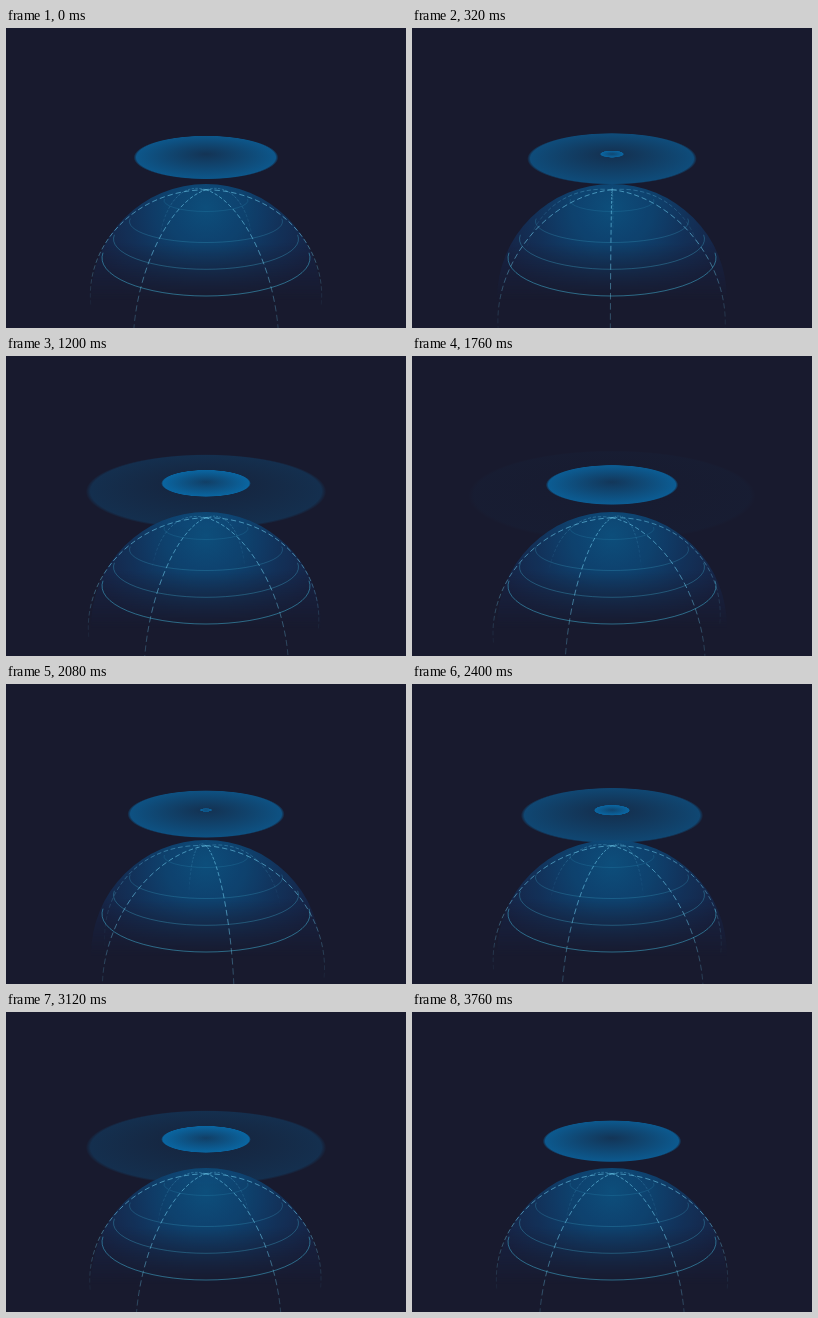
These frames come from a looping animation (400x300 px, 3.84 s). An HTML page:

```html
<!DOCTYPE html>
<html lang="en">
<head>
<meta charset="utf-8">
<title>Globe with ripples</title>
<style>
  html, body { margin: 0; width: 100%; height: 100%; overflow: hidden; background: #181a2e; }
  svg { display: block; width: 100vw; height: 100vh; }
</style>
</head>
<body>
<svg id="stage" viewBox="0 0 400 300">
  <defs>
    <radialGradient id="ball" gradientUnits="userSpaceOnUse" cx="200" cy="180" r="118">
      <stop offset="0" stop-color="#0d517f"/>
      <stop offset=".35" stop-color="#0e4371"/>
      <stop offset=".7" stop-color="#133058"/>
      <stop offset="1" stop-color="#172345"/>
    </radialGradient>
    <linearGradient id="fade" gradientUnits="userSpaceOnUse" x1="0" y1="215" x2="0" y2="272">
      <stop offset="0" stop-color="#fff" stop-opacity=".95"/>
      <stop offset="1" stop-color="#fff" stop-opacity="0"/>
    </linearGradient>
    <mask id="soft" maskUnits="userSpaceOnUse" x="0" y="0" width="400" height="300">
      <rect width="400" height="300" fill="url(#fade)"/>
    </mask>
  </defs>
  <rect width="400" height="300" fill="#181a2e"/>
  <g id="ripples"></g>
  <circle cx="200" cy="271" r="115" fill="url(#ball)" mask="url(#soft)"/>
  <g id="rings" fill="none" stroke="#43b4d6"></g>
  <g id="meridians" stroke="#6cc8ea"></g>
</svg>
<script>
const STEP = 80, FRAMES = 48, CX = 200;
const RAD = Math.PI / 180;
const $ = id => document.getElementById(id);

function add(parent, tag, attrs) {
  const el = document.createElementNS("http://www.w3.org/2000/svg", tag);
  parent.append(el);
  return set(el, attrs);
}
function set(el, attrs) {
  for (const key in attrs) el.setAttribute(key, attrs[key]);
  return el;
}
const clamp = v => Math.max(0, Math.min(1, v));

// Ripples: flat discs seen in perspective
const RIPPLE = { y: 126, depth: 430, radius: 143, sin: 0.954, cos: 0.3 };

function makeRipple(name) {
  const grad = add($("ripples"), "radialGradient", { id: name, cx: 0.5, cy: 0.5, r: 0.5, fx: 0.5 });
  for (const [offset, alpha] of [[0, 0.36], [0.5, 0.61], [0.96, 0.85], [1, 0]])
    add(grad, "stop", { offset, "stop-color": "#0870b1", "stop-opacity": alpha });
  return { grad, disc: add($("ripples"), "ellipse", { cx: CX, fill: `url(#${name})` }) };
}
const oldRipple = makeRipple("wide"), newRipple = makeRipple("small");

function drawRipple({ grad, disc }, life) {
  const r = RIPPLE.radius * life;
  const k = r * RIPPLE.sin / RIPPLE.depth;
  const near = r * RIPPLE.cos / (1 - k), far = r * RIPPLE.cos / (1 + k);
  set(disc, {
    cy: RIPPLE.y + (near - far) / 2,
    rx: r / Math.sqrt(1 - k * k),
    ry: (near + far) / 2,
    opacity: clamp((0.98 - life) / 0.58)
  });
  if (r) grad.setAttribute("fy", far / (near + far));
}

// Latitude arcs: half width, middle height, drop, opacity, line width
for (const [rx, y, ry, alpha, width] of [
  [104, 230, 38, 0.65, 0.8], [92.5, 211, 30.3, 0.48, 0.7],
  [76.5, 193.5, 21, 0.38, 0.65], [42, 172.5, 11, 0.27, 0.6]
]) {
  const a = 8 * RAD, x = rx * Math.cos(a), top = y - ry * Math.sin(a);
  add($("rings"), "path", {
    d: `M${CX - x} ${top}A${rx} ${ry} 0 1 0 ${CX + x} ${top}`,
    "stroke-opacity": alpha, "stroke-width": width
  });
}

// Meridians: dashed half circles from the pole to the equator
const GLOBE = { y: 279, radius: 115, depth: 442, sin: 0.908, cos: 0.42 };
const DASH = 2.4, PERIOD = 3.75, COUNT = 24;

function project(lat, az) {
  const flat = GLOBE.radius * Math.cos(lat * RAD);
  const up = GLOBE.radius * Math.sin(lat * RAD);
  const out = flat * Math.cos(az * RAD);
  const f = GLOBE.depth / (GLOBE.depth - out * GLOBE.sin - up * GLOBE.cos);
  return [CX + flat * Math.sin(az * RAD) * f, GLOBE.y + (out * GLOBE.cos - up * GLOBE.sin) * f];
}

const dashes = [];
for (let m = 0; m < 6; m++)
  for (let i = 0; i < COUNT; i++)
    dashes.push({ az: 30 + 60 * m, lat: 90 - i * PERIOD, el: add($("meridians"), "line", {}) });

function drawDash({ az, lat, el }, turn) {
  const angle = az + turn, mid = lat - DASH / 2;
  const [x1, y1] = project(lat, angle), [x2, y2] = project(lat - DASH, angle);
  const front = clamp(1 + (Math.cos(angle * RAD) + 0.1) * 2.5);
  const shown = 0.75 * clamp((mid + 2) / 45);
  const hidden = 0.5 * clamp((mid - 18) / 50);
  set(el, {
    x1, y1, x2, y2,
    "stroke-opacity": hidden + (shown - hidden) * front,
    "stroke-width": 0.6 + 0.2 * front
  });
}

function draw(time) {
  const n = Math.floor(time / STEP) % FRAMES;
  const half = FRAMES / 2, age = n % half;
  drawRipple(newRipple, age / FRAMES);
  drawRipple(oldRipple, (age + half) / FRAMES);
  const turn = -360 * n / (FRAMES - 1);
  for (const dash of dashes) drawDash(dash, turn);
}

const start = performance.now();
function tick() {
  draw(performance.now() - start);
  requestAnimationFrame(tick);
}
tick();
</script>
</body>
</html>
```
